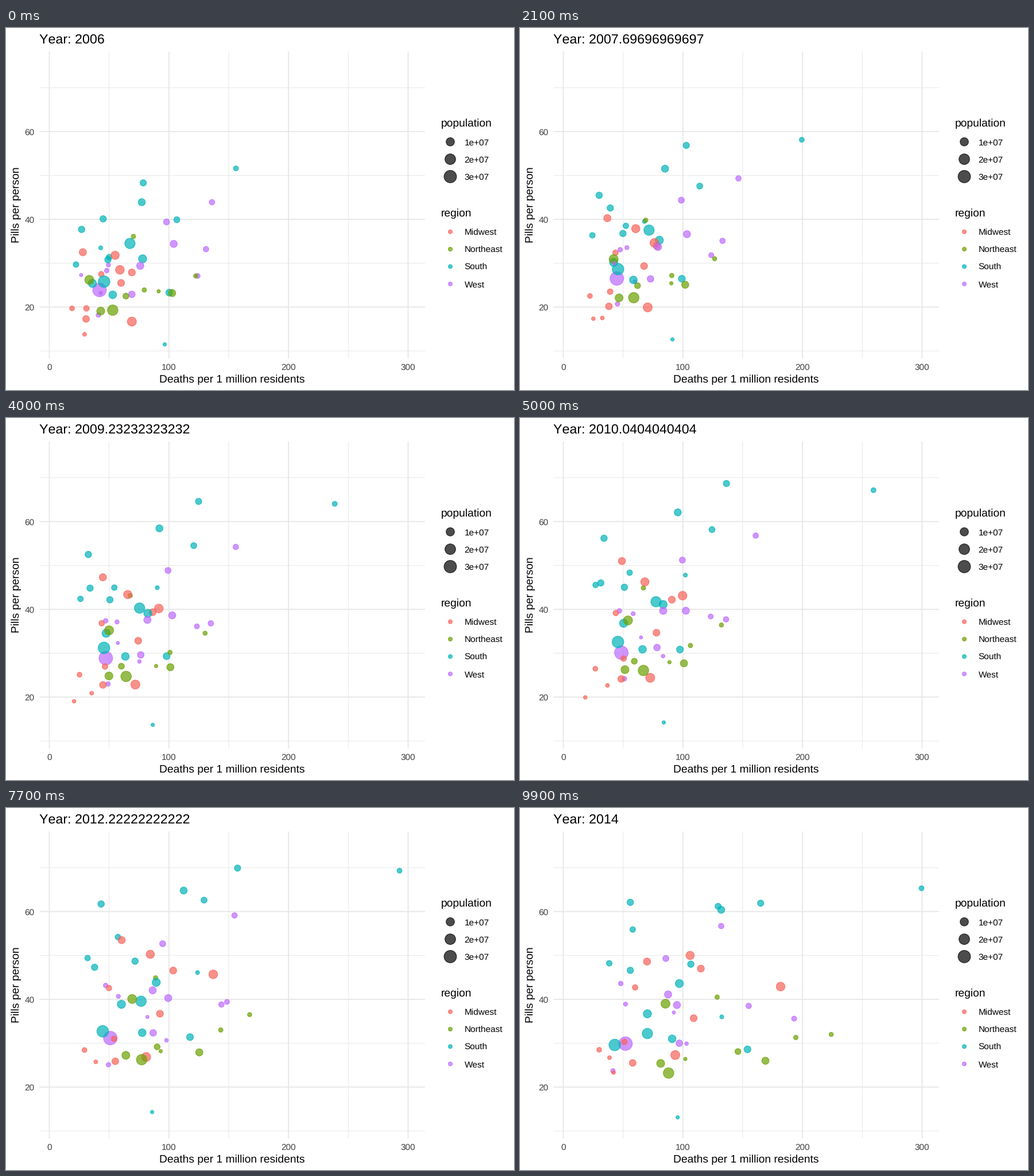
A matplotlib script that plays this animation: 885 by 632 pixels, repeating every 10000 ms.

```python
import matplotlib.pyplot as plt
import numpy as np
from matplotlib.animation import FuncAnimation

W, H, DPI = 885, 632, 100
FRAMES, INTERVAL = 100, 100
PT = 72 / DPI  # points per pixel

MIDWEST, NORTHEAST, SOUTH, WEST = "#f7635a", "#6aa000", "#00b3b9", "#bc6aff"
GRID, TICK = "#e7e7e7", "#3f3f3f"
ALPHA, STROKE = 0.7, 1.25
TICK_SIZE, AXIS_SIZE, TITLE_SIZE = 15.45, 19.31, 23.2

FIRST, PEAK, LAST = 2006, 2011.2, 2014

plt.rcParams.update({"font.family": "Liberation Sans", "text.hinting": "none",
                     "text.kerning_factor": 6})
fig = plt.figure(figsize=(W / DPI, H / DPI), dpi=DPI, facecolor="white")
ax = fig.add_axes([0, 0, 1, 1])
ax.set(xlim=(0, W), ylim=(H, 0))
ax.axis("off")


def px(deaths):
    return 75.5 + 2.0833 * deaths


def py(pills):
    return 640.5 - 7.6625 * pills


def point_radius(size):
    return 1.8745 * size + 0.6227


def pop_radius(millions):
    return point_radius(1 + 5 * np.sqrt((millions - 0.5) / 37.5))


def label(x, y, s, size, color="black", ha="left", rotation=0):
    return ax.text(x, y, s, fontsize=size * PT, color=color, ha=ha,
                   va="baseline", rotation=rotation, rotation_mode="anchor")


def line(xs, ys, width):
    ax.plot(xs, ys, color=GRID, lw=width * PT, snap=False,
            solid_capstyle="butt", zorder=1)


def circles(xs, ys, radii, colors):
    return ax.scatter(xs, ys, s=(2 * np.asarray(radii) * PT) ** 2, c=colors,
                      edgecolors=colors, alpha=ALPHA, linewidths=STROKE * PT,
                      zorder=3)


class State:
    """A dot that climbs from start to peak, then moves on to end."""

    def __init__(self, color, millions, start, peak, end, missing=()):
        self.color, self.radius = color, pop_radius(millions)
        self.deaths, self.pills = zip(start, peak, end)
        self.missing = missing

    def at(self, year):
        if any(abs(year - m) < 0.97 for m in self.missing):
            return np.nan, np.nan
        when = FIRST, PEAK, LAST
        return (px(np.interp(year, when, self.deaths)),
                py(np.interp(year, when, self.pills)))


# (deaths, pills) at the three key years; the order sets the stacking
states = [
    State(SOUTH, 4.7, (27, 37.7), (36, 61.5), (56, 62.1)),
    State(WEST, 0.7, (43, 23.2), (95, 31.1), (103, 29.9)),
    State(WEST, 6.4, (104, 34.4), (102, 41.2), (95, 38.7)),
    State(SOUTH, 2.9, (50, 31.4), (57, 53.2), (58, 55.9)),
    State(WEST, 37.5, (42, 23.9), (50.4, 31.9), (52, 29.9)),
    State(WEST, 5, (69, 22.9), (81, 33.7), (97, 30)),
    State(NORTHEAST, 3.5, (64, 22.5), (58, 29.8), (146, 28.1)),
    State(SOUTH, 0.9, (43, 33.5), (119, 51.9), (132.5, 36)),
    State(SOUTH, 0.6, (96.5, 11.5), (80.4, 15), (95.6, 13.1)),
    State(SOUTH, 18.8, (67.4, 34.5), (80.4, 43.8), (70.3, 32.2)),
    State(SOUTH, 9.6, (36, 25.4), (54.5, 40.1), (70.3, 36.7)),
    State(WEST, 1.4, (41, 18.2), (54, 25.9), (41.5, 23.7)),
    State(WEST, 1.5, (48, 28.3), (46.6, 42.9), (48, 43.6)),
    State(MIDWEST, 12.8, (69, 16.7), (73.7, 26.6), (93.6, 27.3)),
    State(MIDWEST, 6.5, (28, 32.5), (55, 56.3), (70, 48.6)),
    State(MIDWEST, 3, (31, 19.7), (56, 31.4), (51, 30.3)),
    State(MIDWEST, 2.8, (43.4, 27.5), (44, 42.5), (60, 42.7)),
    State(SOUTH, 4.3, (78.5, 48.3), (153, 74.5), (165, 61.9)),
    State(SOUTH, 4.5, (45, 40.1), (27.4, 47.7), (56, 46.6)),
    State(NORTHEAST, 1.3, (70.3, 36.1), (66, 47.4), (128.6, 40.5)),
    State(SOUTH, 5.7, (100.3, 23.3), (96.7, 33), (154, 28.6)),
    State(NORTHEAST, 6.5, (102.7, 23.2), (100.3, 29), (169, 26)),
    State(MIDWEST, 9.9, (55, 31.8), (72, 50.4), (106, 50)),
    State(MIDWEST, 5.3, (30.7, 17.3), (53.5, 26.1), (58, 25.5)),
    State(SOUTH, 2.9, (22.3, 29.7), (28.3, 50.1), (38.4, 48.2)),
    State(MIDWEST, 5.9, (69, 27.9), (97, 46.3), (115, 47)),
    State(WEST, 1, (49.4, 29.6), (61, 41.7), (52, 38.9)),
    State(MIDWEST, 1.8, (19, 19.7), (29, 28.4), (30, 28.5)),
    State(WEST, 2.7, (136, 43.9), (168, 60.5), (132, 56.7)),
    State(NORTHEAST, 1.3, (79.4, 23.9), (114, 34), (194.4, 31.3)),
    State(NORTHEAST, 8.8, (43, 19.1), (54, 28.3), (81.4, 25.4)),
    State(WEST, 2, (124, 27.1), (123, 41.6), (193, 35.6)),
    State(NORTHEAST, 19.4, (53, 19.3), (71, 28), (88, 23.2)),
    State(SOUTH, 9.4, (78, 31), (85, 44), (97, 43.6)),
    State(MIDWEST, 0.7, (30, 15.5), (15, 21.2), (42, 23.3), (2006, 2012)),
    State(MIDWEST, 11.5, (59, 28.5), (111.4, 47.3), (181.7, 42.9)),
    State(SOUTH, 3.7, (106.6, 39.9), (129.4, 63.4), (129.4, 61.2)),
    State(WEST, 3.8, (98, 39.4), (100, 54.6), (85.7, 49.3)),
    State(NORTHEAST, 12.6, (33.4, 26.2), (60, 40.7), (85.4, 39)),
    State(NORTHEAST, 1.1, (122.4, 27.1), (135, 39.1), (224, 32)),
    State(SOUTH, 4.6, (49, 30.8), (51.6, 49.1), (106.6, 48)),
    State(MIDWEST, 0.8, (29.5, 13.8), (39, 25.2), (38.6, 26.7)),
    State(SOUTH, 6.3, (77.3, 43.9), (101, 67.3), (132, 60.4)),
    State(SOUTH, 25.2, (45.8, 25.8), (45.6, 34.5), (43, 29.6)),
    State(WEST, 2.7, (131, 33.2), (137.5, 39), (155, 38.5)),
    State(NORTHEAST, 0.6, (91.4, 23.6), (88, 29.2), (102, 26.4)),
    State(SOUTH, 8, (53, 22.8), (70, 33.2), (91, 31)),
    State(WEST, 6.7, (76, 29.4), (85.7, 42.6), (87.6, 41.1)),
    State(SOUTH, 1.9, (156, 51.6), (289, 71.6), (299.5, 65.3)),
    State(MIDWEST, 5.7, (60, 25.5), (83, 37.3), (109, 35.7)),
    State(WEST, 0.55, (26.6, 27.3), (76, 35.4), (92.4, 37)),
]

# Panel grid and axes
LEFT, RIGHT, TOP, BOTTOM = 58.3, 730, 41, 577
for v in range(0, 301, 50):
    major = v % 100 == 0
    line([px(v)] * 2, [TOP, BOTTOM], 1.87 if major else 0.94)
    if major:
        label(px(v), 596.7, str(v), TICK_SIZE, TICK, "center")
for v in range(10, 71, 10):
    major = v % 20 == 0
    line([LEFT, RIGHT], [py(v)] * 2, 1.87 if major else 0.94)
    if major:
        label(49.5, py(v) + 5.7, str(v), TICK_SIZE, TICK, "right")
mid_x, mid_y = (LEFT + RIGHT) / 2, (TOP + BOTTOM) / 2
label(mid_x, 619, "Deaths per 1 million residents", AXIS_SIZE, ha="center")
label(23.3, mid_y, "Pills per person", AXIS_SIZE, ha="center", rotation=90)
title = label(58, 26.5, "", TITLE_SIZE)


def legend(name, y, names, radii, colors):
    label(758, y, name, AXIS_SIZE)
    ys = y + 26.7 + 30.36 * np.arange(len(names))
    circles([774] * len(names), ys, radii, colors)
    for key_y, s in zip(ys, names):
        label(798.5, key_y + 5.7, s, TICK_SIZE)


legend("population", 172, ("1e+07", "2e+07", "3e+07"),
       [pop_radius(m) for m in (10, 20, 30)], ["black"] * 3)
legend("region", 329, ("Midwest", "Northeast", "South", "West"),
       [point_radius(1.5)] * 4, [MIDWEST, NORTHEAST, SOUTH, WEST])

dots = circles(np.zeros(len(states)), np.zeros(len(states)),
               [s.radius for s in states], [s.color for s in states])


def update(i):
    year = FIRST + (LAST - FIRST) * i / (FRAMES - 1)
    dots.set_offsets([s.at(year) for s in states])
    title.set_text(f"Year: {year:.15g}")
    return dots, title


anim = FuncAnimation(fig, update, frames=FRAMES, interval=INTERVAL,
                     repeat=True, repeat_delay=0)
plt.show()
```
